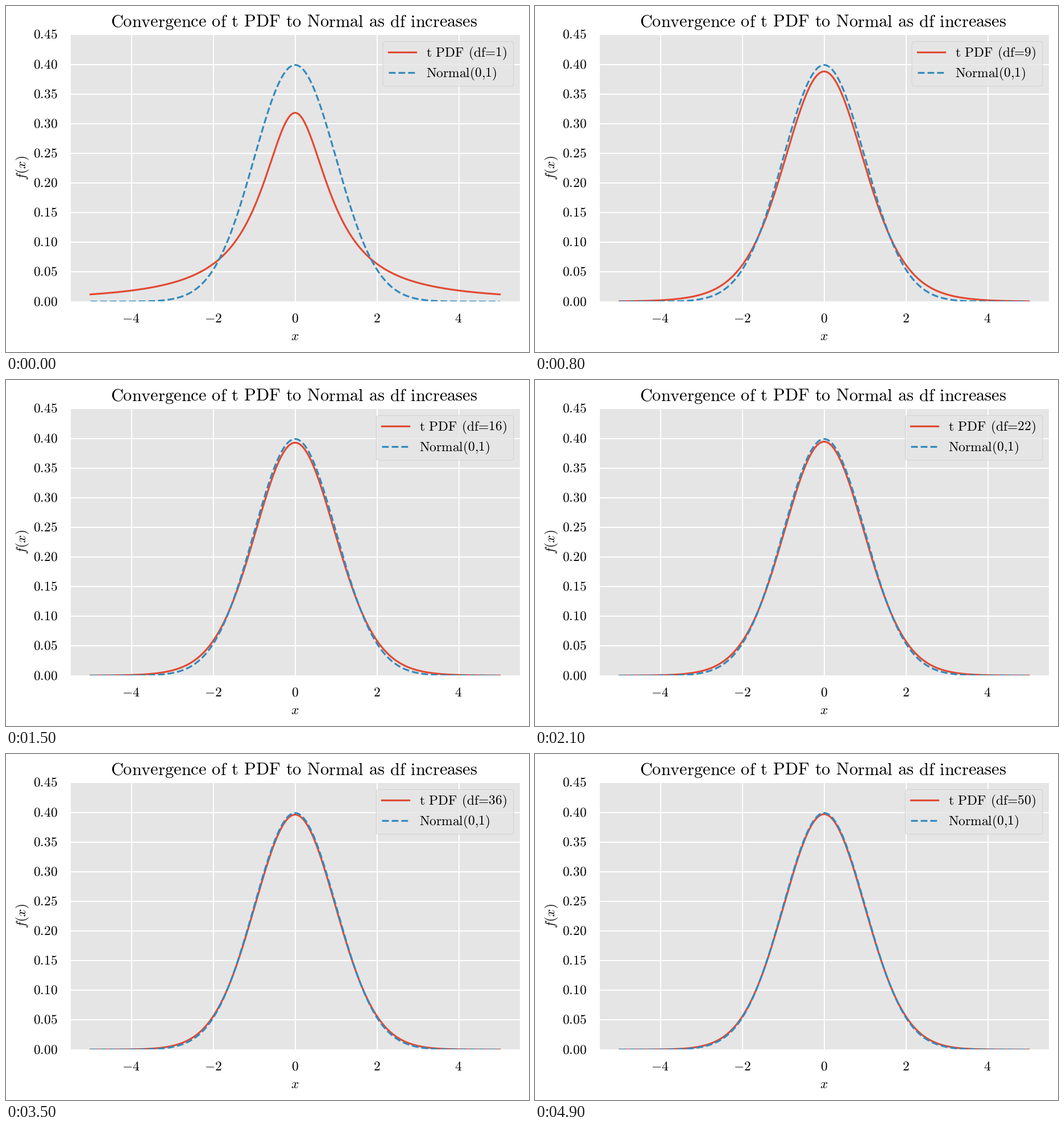
Write a matplotlib script that moves like this. It is 920x608 px and loops after 5000 ms.

```python
import math

import matplotlib.pyplot as plt
import numpy as np
from matplotlib.animation import FuncAnimation
from matplotlib.patches import FancyBboxPatch

WIDTH, HEIGHT, DPI = 920, 608, 144
LEFT, RIGHT, TOP, BOTTOM = 112.6, 904.6, 50.45, 519.51
RED, BLUE, PANEL = "#E24A33", "#348ABD", "#E5E5E5"
TEXT_SIZE, DIGIT_WIDTH = 11.75, 11.75
LINE_WIDTH = 1.6
LEGEND_RIGHT, LEGEND_TOP, LEGEND_BOTTOM = 893, 62.5, 141

plt.rcParams.update({"mathtext.fontset": "cm", "text.hinting": "none"})

fig = plt.figure(figsize=(WIDTH / DPI, HEIGHT / DPI), dpi=DPI, facecolor="white")
ax = fig.add_axes([LEFT / WIDTH, 1 - BOTTOM / HEIGHT,
                   (RIGHT - LEFT) / WIDTH, (BOTTOM - TOP) / HEIGHT],
                  facecolor=PANEL)

# Overlay in pixel coordinates, measured from the top left.
canvas = fig.add_axes([0, 0, 1, 1], zorder=2)
canvas.set(xlim=(0, WIDTH), ylim=(HEIGHT, 0))
canvas.axis("off")


def roman(words):
    return rf"$\text{{{words}}}$"


def put(x, y, words, size=TEXT_SIZE, ha="center", **kwargs):
    return canvas.text(x, y, words, size=size, ha=ha, va="baseline",
                       color="black", **kwargs)


def normal_pdf(x):
    return np.exp(-x**2 / 2) / math.sqrt(2 * math.pi)


def t_pdf(x, df):
    log_scale = math.lgamma((df + 1) / 2) - math.lgamma(df / 2)
    return (math.exp(log_scale) / math.sqrt(df * math.pi)
            * (1 + x**2 / df) ** (-(df + 1) / 2))


x_ticks = np.arange(-4, 5, 2)
y_ticks = np.arange(10) * 0.05
ax.set(xlim=(-5.5, 5.5), ylim=(0, 0.45), xticks=x_ticks, yticks=y_ticks)
ax.tick_params(length=0, labelbottom=False, labelleft=False)
ax.set_axisbelow(True)
ax.grid(color="white", linewidth=1)
for spine in ax.spines.values():
    spine.set(color="white", linewidth=1)

for tick in x_ticks:
    put(LEFT - 0.6 + (tick + 5.5) * (RIGHT - LEFT) / 11, 556, f"${tick}$")
for tick in y_ticks:
    put(91, BOTTOM + 7.5 - tick / 0.45 * (BOTTOM - TOP), f"${tick:.2f}$", ha="right")

put(507, 37, roman("Convergence of t PDF to Normal as df increases"), size=15.2)
put(508.5, 587, "$x$")
put(35, 285, "$f(x)$", rotation=90, rotation_mode="anchor")

x = np.linspace(-5, 5, 500)
t_line, = ax.plot(x, t_pdf(x, 1), color=RED, linewidth=LINE_WIDTH)
ax.plot(x, normal_pdf(x), "--", color=BLUE, linewidth=LINE_WIDTH)

legend_box = canvas.add_patch(FancyBboxPatch(
    (0, LEGEND_TOP), 0, LEGEND_BOTTOM - LEGEND_TOP,
    boxstyle="round,pad=0,rounding_size=4.8",
    facecolor=PANEL, edgecolor="0.8", linewidth=0.5, alpha=0.8))
t_handle, = canvas.plot([], [], color=RED, linewidth=LINE_WIDTH)
normal_handle, = canvas.plot([], [], "--", color=BLUE, linewidth=LINE_WIDTH)
t_text = put(0, 89.6, "", ha="left")
normal_text = put(0, 125.4, roman("Normal(0,1)"), ha="left")


def update(frame):
    df = frame + 1
    t_line.set_ydata(t_pdf(x, df))

    width = 230 + DIGIT_WIDTH * (len(str(df)) - 1)
    left = LEGEND_RIGHT - width
    legend_box.set_x(left)
    legend_box.set_width(width)
    t_handle.set_data([left + 9.6, left + 57.6], [81.2, 81.2])
    normal_handle.set_data([left + 9.6, left + 57.6], [117, 117])
    t_text.set_text(roman(f"t PDF (df={df})"))
    for text in (t_text, normal_text):
        text.set_x(left + 76)


animation = FuncAnimation(fig, update, frames=50, interval=100, repeat=True)
plt.show()
```
